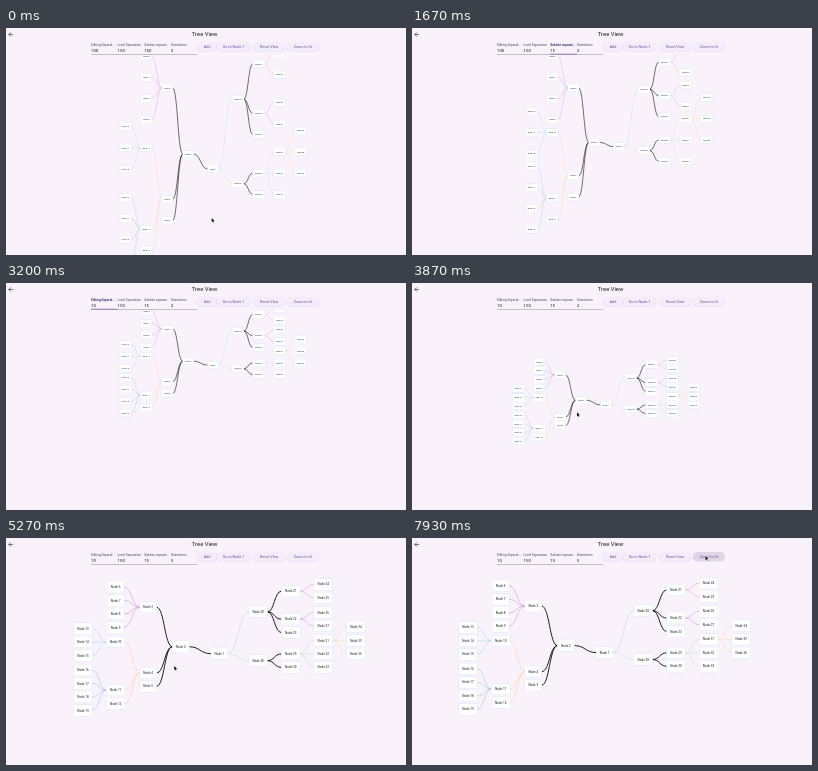
Animation, 400 px wide and 227 px high, one loop 8 s. Source, as an HTML page with a canvas:

```html
<!DOCTYPE html>
<html lang="en">
<head>
<meta charset="utf-8">
<title>Tree View</title>
<style>
html, body { margin: 0; width: 100%; height: 100%; overflow: hidden; background: #f9f2fb; }
canvas { display: block; width: 400px; height: 227px; }
</style>
</head>
<body>
<canvas id="stage"></canvas>
<script>
const W = 400, H = 227, LOOP = 8000;
const UI = 0.267; // stage pixels per interface pixel
const FONT = 'Roboto, "Open Sans", sans-serif';
const BG = '#f9f2fb', INK = '#1d1b20', MUTED = '#49454f', ACCENT = '#6750a4';

const canvas = document.getElementById('stage');
const ctx = canvas.getContext('2d');
const dpr = window.devicePixelRatio || 1;
canvas.width = W * dpr;
canvas.height = H * dpr;

const lerp = (a, b, p) => a + (b - a) * p;
const ramp = (t, from, to) => Math.min(1, Math.max(0, (t - from) / (to - from)));
const ease = p => p * p * (3 - 2 * p);

// keys: [time, ...values]
function track(keys, t) {
  let i = 0;
  while (i < keys.length - 2 && t >= keys[i + 1][0]) i++;
  const a = keys[i], b = keys[i + 1];
  const p = ease(ramp(t, a[0], b[0]));
  return a.slice(1).map((v, j) => lerp(v, b[j + 1], p));
}

// parent, first child, last child, colour, heavy
const EDGES = [
  [1, 2, 2, '#000', 1],
  [1, 20, 20, '#b5d9dc'],
  [1, 28, 28, '#cbdcd2'],
  [2, 3, 5, '#000', 1],
  [3, 6, 9, '#c891d8'],
  [4, 10, 12, '#fbcf9f'],
  [10, 13, 15, '#a5d6f6'],
  [11, 16, 19, '#a3c3dd'],
  [20, 21, 23, '#000', 1],
  [21, 24, 25, '#efa3c4'],
  [22, 26, 27, '#c79ae0'],
  [28, 29, 30, '#000', 1],
  [29, 31, 33, '#c3e0d2'],
  [31, 34, 36, '#fbd7a8']
];
const COUNT = 36, NODE_H = 52;
const isLeft = n => n > 1 && n < 20;
const halfWidth = n => n < 10 ? 38.5 : 42.5;

const xs = [0, 0];
for (const [parent, first, last] of EDGES) {
  for (let n = first; n <= last; n++) {
    const step = parent === 1 ? 178 : 150;
    xs[n] = xs[parent] + (isLeft(n) ? -step : step);
  }
}

function layout(sibling, subtree, rightTop) {
  const S = NODE_H + sibling, T = NODE_H + subtree, y = [0];
  const run = (first, count, start) => {
    for (let i = 0; i < count; i++) y[first + i] = start + i * S;
  };
  const mid = (a, b) => (y[a] + y[b]) / 2;
  run(6, 4, 0);
  run(13, 3, y[9] + T - S);
  run(16, 4, y[15] + T);
  y[10] = y[14];
  y[11] = mid(16, 19);
  y[12] = y[11] + S;
  y[3] = mid(6, 9);
  y[4] = mid(10, 12);
  y[5] = y[4] + S;
  y[2] = mid(3, 5);
  run(24, 2, rightTop);
  run(26, 2, y[25] + T);
  run(31, 3, y[27] + T);
  run(34, 3, y[31] - S);
  y[21] = mid(24, 25);
  y[22] = mid(26, 27);
  y[23] = y[22] + S;
  y[20] = mid(21, 23);
  y[29] = y[32];
  y[30] = y[29] + S;
  y[28] = mid(29, 30);
  y[1] = mid(2, 28);
  return y;
}
const LAYOUTS = [layout(100, 150, -21), layout(100, 15, -39), layout(10, 15, -12)];
const SUBTREE_EDIT = 1230, SIBLING_EDIT = 2800, SETTLE = 600;

function nodeYs(t) {
  const a = ease(ramp(t, SUBTREE_EDIT, SUBTREE_EDIT + SETTLE));
  const b = ease(ramp(t, SIBLING_EDIT, SIBLING_EDIT + SETTLE));
  return LAYOUTS[0].map((y, i) => lerp(lerp(y, LAYOUTS[1][i], a), LAYOUTS[2][i], b));
}

// time, origin x, origin y, zoom
const VIEW = [
  [0, 207, 28.2, 0.1394],
  [3640, 207, 28.2, 0.1394],
  [3880, 193.8, 79.2, 0.1394],
  [4130, 193.8, 79.2, 0.1394],
  [4470, 197.3, 77.3, 0.1394],
  [4700, 197.3, 77.3, 0.1394],
  [5290, 213.5, 48.9, 0.2175],
  [5560, 213.5, 48.9, 0.2175],
  [6070, 192.6, 47.8, 0.2175],
  [LOOP, 192.6, 47.8, 0.2175]
];

const POINTER = [
  [0, 205.7, 190],
  [100, 205.7, 190],
  [670, 143, 25],
  [1830, 143, 25],
  [2400, 102, 21.5],
  [3400, 180, 56],
  [3530, 178, 69],
  [3640, 178, 69],
  [3880, 165, 129.5],
  [4130, 165, 129.5],
  [4470, 168.3, 128],
  [5560, 168.3, 128],
  [6070, 147, 126],
  [6540, 147, 126],
  [6600, 166, 119],
  [7400, 293.5, 18],
  [LOOP, 293.5, 18]
];
const pointerShown = t => !((t > 1000 && t < 1860) || (t > 2730 && t < 3440));

function text(str, x, y, size, color, align = 'center') {
  ctx.font = `${size}px ${FONT}`;
  ctx.textAlign = align;
  ctx.textBaseline = 'middle';
  ctx.fillStyle = color;
  ctx.fillText(str, x, y);
}

function box(x, y, w, h, r, color) {
  ctx.fillStyle = color;
  ctx.beginPath();
  ctx.roundRect(x, y, w, h, r);
  ctx.fill();
}

function drawTree(t) {
  const ys = nodeYs(t);
  const [vx, vy, zoom] = track(VIEW, t);
  ctx.save();
  ctx.beginPath();
  ctx.rect(0, 26.6, W, H);
  ctx.clip();
  ctx.translate(vx, vy);
  ctx.scale(zoom, zoom);
  for (const [p, first, last, color, heavy] of EDGES) {
    ctx.strokeStyle = color;
    ctx.lineWidth = heavy ? 4 : 2.6;
    for (let n = first; n <= last; n++) {
      const side = isLeft(n) ? -1 : 1;
      const x0 = xs[p] + side * halfWidth(p), x1 = xs[n] - side * halfWidth(n);
      const mx = (x0 + x1) / 2;
      ctx.beginPath();
      ctx.moveTo(x0, ys[p]);
      ctx.bezierCurveTo(mx, ys[p], mx, ys[n], x1, ys[n]);
      ctx.stroke();
    }
  }
  for (let n = 1; n <= COUNT; n++) {
    const w = halfWidth(n), h = NODE_H / 2, x = xs[n], y = ys[n];
    box(x - w - 1, y - h - 1, 2 * w + 2, NODE_H + 2, 5, '#c3e0f8');
    box(x - w, y - h, 2 * w, NODE_H, 4, '#fff');
    text('Node ' + n, x, y + 1, 14, INK);
  }
  ctx.restore();
}

const FIELD_W = 26.6, FIELD_X = 85;
const FOCUS = { 0: [2590, 3660], 2: [870, 2590] };

function drawField(i, label, value, t) {
  const x = FIELD_X + i * FIELD_W;
  const [on, off] = FOCUS[i] || [LOOP, LOOP + 1];
  const focus = ramp(t, on, on + 170) * (1 - ramp(t, off, off + 170));
  const active = t >= on && t < off;
  text(label, x, 16.9, 12 * UI, MUTED, 'left');
  ctx.globalAlpha = focus;
  text(label, x, 16.9, 12 * UI, ACCENT, 'left');
  ctx.globalAlpha = 1;
  text(value, x, 22.6, 16 * UI, INK, 'left');
  if (active && (t - on) % 1000 < 600) {
    const w = ctx.measureText(value).width;
    ctx.fillStyle = ACCENT;
    ctx.fillRect(x + w + 0.2, 19.8, 0.6, 5.6);
  }
  ctx.fillStyle = MUTED;
  ctx.fillRect(x, 26, FIELD_W, 0.3);
  ctx.globalAlpha = focus;
  ctx.fillStyle = ACCENT;
  ctx.fillRect(x, 25.8, FIELD_W, 0.6);
  ctx.globalAlpha = 1;
}

function drawButton(label, x, w, hover = 0) {
  const y = 14.1, h = 8.9;
  ctx.save();
  ctx.shadowColor = 'rgba(60, 40, 90, 0.22)';
  ctx.shadowBlur = 0.9 * dpr;
  ctx.shadowOffsetY = 0.3 * dpr;
  box(x - w / 2, y, w, h, h / 2, '#f3ecf9');
  ctx.restore();
  if (hover) box(x - w / 2, y, w, h, h / 2, `rgba(80, 64, 110, ${0.13 * hover})`);
  text(label, x, 18.6, 14 * UI, ACCENT);
}

function drawHeader(t) {
  ctx.strokeStyle = INK;
  ctx.lineWidth = 0.6;
  ctx.beginPath();
  ctx.moveTo(7, 6.5);
  ctx.lineTo(2.9, 6.5);
  ctx.moveTo(4.9, 4.4);
  ctx.lineTo(2.8, 6.5);
  ctx.lineTo(4.9, 8.6);
  ctx.stroke();
  text('Tree View', 198.6, 6.6, 22 * UI, INK);

  drawField(0, 'Editing Separat…', t < SIBLING_EDIT ? '100' : '10', t);
  drawField(1, 'Level Separation', '150', t);
  drawField(2, 'Subtree separat…', t < SUBTREE_EDIT ? '150' : '15', t);
  drawField(3, 'Orientation', '3', t);

  drawButton('Add', 201, 20);
  drawButton('Go to Node 1', 227.6, 33.4);
  drawButton('Reset View', 263.2, 32);
  drawButton('Zoom to fit', 296.8, 32, ramp(t, 7330, 7530));
}

function drawPointer(t) {
  if (!pointerShown(t)) return;
  const [x, y] = track(POINTER, t);
  ctx.save();
  ctx.translate(x, y);
  ctx.beginPath();
  ctx.moveTo(0, 0);
  ctx.lineTo(0, 4);
  ctx.lineTo(0.9, 3.2);
  ctx.lineTo(1.6, 4.7);
  ctx.lineTo(2.2, 4.4);
  ctx.lineTo(1.6, 3);
  ctx.lineTo(2.8, 2.9);
  ctx.closePath();
  ctx.strokeStyle = '#fff';
  ctx.lineWidth = 0.7;
  ctx.stroke();
  ctx.fillStyle = '#000';
  ctx.fill();
  ctx.restore();
}

function draw(t) {
  ctx.setTransform(dpr, 0, 0, dpr, 0, 0);
  ctx.fillStyle = BG;
  ctx.fillRect(0, 0, W, H);
  drawTree(t);
  drawHeader(t);
  drawPointer(t);
}

const start = performance.now();
function tick() {
  draw((performance.now() - start) % LOOP);
  requestAnimationFrame(tick);
}
tick();
</script>
</body>
</html>
```
